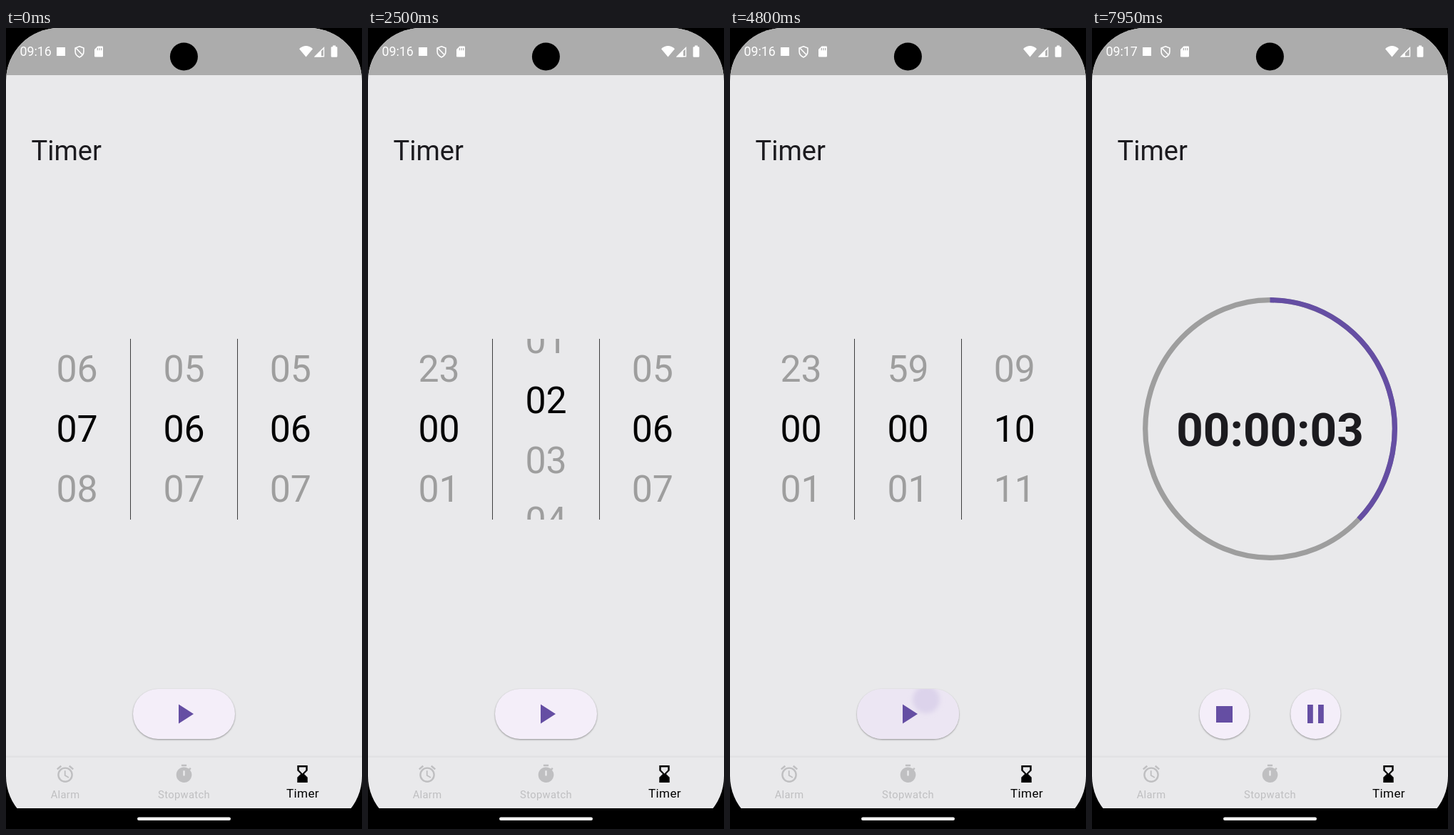
An HTML page for the animation above (8000 ms loop, 499x1121 px).

```html
<!DOCTYPE html>
<html lang="en">
<head>
<meta charset="utf-8">
<title>Timer</title>
<style>
  html, body { margin: 0; width: 100%; height: 100%; overflow: hidden; background: #000; }
  svg { display: block; width: 499px; height: 1121px; font-family: Roboto, Arial, sans-serif; }
  .mid { text-anchor: middle; }
  .wheel text { font-size: 51.8px; fill: #9e9e9e; text-anchor: middle; }
  .wheel text.on { fill: #000; }
  .nav { font-size: 14.7px; letter-spacing: .35px; fill: #bfbfc1; }
  .nav .on { font-size: 17.1px; fill: #000; }
  .button { fill: #f4eef9; filter: drop-shadow(0 1px 1.3px rgba(0, 0, 0, .38)); }
  .glyph { fill: #654ea3; }
  .ring { fill: none; stroke-width: 7.2; }
</style>
</head>
<body>
<svg viewBox="0 0 499 1121">
  <defs>
    <clipPath id="screen"><rect width="499" height="1121" rx="74"/></clipPath>
    <clipPath id="window"><rect y="435" width="499" height="253"/></clipPath>
    <clipPath id="pill"><rect x="178" y="925" width="143" height="70" rx="35"/></clipPath>
    <filter id="soft" x="-50%" y="-50%" width="200%" height="200%"><feGaussianBlur stdDeviation="3"/></filter>
  </defs>
  <rect width="499" height="1121"/>
  <g clip-path="url(#screen)">
    <rect width="499" height="1092" fill="#e9e9eb"/>
    <rect width="499" height="66" fill="#acacac"/>
    <rect y="1018.5" width="499" height="2.5" fill="#e2e2e4"/>
  </g>
  <circle cx="249.4" cy="40" r="19.5"/>
  <rect x="184" y="1104.5" width="131" height="4.5" rx="2.2" fill="#f4f4f4"/>

  <!-- status bar -->
  <g fill="#fff">
    <text id="clock" x="19.5" y="38.6" font-size="17.8"></text>
    <rect x="71" y="27" width="12" height="12"/>
    <path d="M103 25.8l5.9 2.3v5q0 5.3-5.9 7.9q-5.9-2.6-5.9-7.9v-5zM98.5 28.5l9 9.5" fill="none" stroke="#fff" stroke-width="1.6"/>
    <path d="M128.5 25.5h6.3q1.2 0 1.2 1.2v12.6q0 1.2-1.2 1.2h-9.6q-1.2 0-1.2-1.2v-9.3z"/>
    <path d="M128.3 28v3.2M131 28v3.2M133.7 28v3.2" stroke="#acacac" stroke-width="1.2"/>
    <path d="M411 29.3q9.5-8.4 19 0l-9.5 11.2z"/>
    <path d="M433.5 39.8l12-12v12z" fill="none" stroke="#fff" stroke-width="1.4"/>
    <path id="signal"/>
    <path d="M458 24.6h4v1.6h1.2q1.2 0 1.2 1.2v12.2q0 1.2-1.2 1.2h-6.4q-1.2 0-1.2-1.2v-12.2q0-1.2 1.2-1.2h1.2z"/>
  </g>

  <text x="35.5" y="185" font-size="38" fill="#1c1b1f">Timer</text>

  <g id="picker">
    <g clip-path="url(#window)">
      <g class="wheel"></g><g class="wheel"></g><g class="wheel"></g>
    </g>
    <path d="M174.5 435v253M324.5 435v253" stroke="#3c3c3c"/>
    <rect class="button" x="178" y="925" width="143" height="70" rx="35"/>
    <g id="press" clip-path="url(#pill)">
      <rect x="178" y="925" width="143" height="70" fill="#ece6f3"/>
      <circle cx="275" cy="940" r="19" fill="#dcd3eb" filter="url(#soft)"/>
    </g>
    <path class="glyph" d="M242 946.5v27l21-13.5z"/>
  </g>

  <g id="countdown">
    <ellipse class="ring" cx="249.5" cy="561" rx="174.8" ry="180.3" stroke="#9e9e9e"/>
    <path id="arc" class="ring" stroke="#654ea3"/>
    <text id="left" class="mid" x="249.5" y="585" font-size="65.5" font-weight="700" fill="#1c1b1f"></text>
    <circle class="button" cx="185.6" cy="960" r="35"/>
    <circle class="button" cx="313.4" cy="960" r="35"/>
    <path class="glyph" d="M174 949h23v23h-23zM302 947h7.8v26h-7.8zM317 947h7.8v26h-7.8z"/>
  </g>

  <g class="nav mid">
    <path transform="translate(68.6 1029.6) scale(1.2)" d="M22 5.72l-4.6-3.86-1.29 1.53 4.6 3.86zM7.88 3.39L6.6 1.86 2 5.71l1.29 1.53zM12.5 8H11v6l4.75 2.85.75-1.23-4-2.37zM12 4a9 9 0 0 0 0 18a9 9 0 0 0 0-18zm0 16a7 7 0 0 1 0-14a7 7 0 0 1 0 14z"/>
    <path transform="translate(235.1 1029.6) scale(1.2)" d="M9 1h6v2H9zM19.03 7.39l1.42-1.42q-.65-.77-1.41-1.41l-1.42 1.42A9 9 0 0 0 12 4a9 9 0 0 0 0 18a9 9 0 0 0 7.03-14.61zM13 14h-2V8h2z"/>
    <path class="on" transform="translate(401.1 1029.6) scale(1.2)" d="M18 22v-6l-4-4 4-4V2H6v6l4 4-4 4v6zM8 7.5V4h8v3.5l-4 4z"/>
    <text x="83" y="1078">Alarm</text>
    <text x="249.5" y="1078">Stopwatch</text>
    <text class="on" x="416" y="1077.3">Timer</text>
  </g>
</svg>
<script>
const LOOP = 8000, STEP = 50, ROW = 84;
const PRESS = 4800, START = 4850;
const $ = id => document.getElementById(id);
const pad = n => String(n).padStart(2, '0');
const show = (el, on) => el.style.display = on ? '' : 'none';

const easeOut = power => u => 1 - (1 - u) ** power;
const fling = u => u < 1 ? 1 - Math.exp(-4.98 * u) : 1;
const move = (t, from, to, ease) => ease(Math.min(1, Math.max(0, (t - from) / (to - from))));

const wheels = [
  { x: 99.5, size: 24, at: t => 7 - 6 * move(t, 350, 1150, easeOut(2))
      - .714 * move(t, 1200, 1450, easeOut(1.5)) - .286 * move(t, 1550, 1700, easeOut(2)) },
  { x: 249.5, size: 60, at: t => 6 - 6 * move(t, 1950, 3450, easeOut(1.94)) },
  { x: 398.8, size: 60, at: t => 6 + 4 * move(t, 3700, 4500, fling) }
];
document.querySelectorAll('.wheel').forEach((group, i) => {
  wheels[i].rows = [-2, -1, 0, 1, 2].map(offset => {
    const text = document.createElementNS('http://www.w3.org/2000/svg', 'text');
    text.setAttribute('x', wheels[i].x);
    if (!offset) text.setAttribute('class', 'on');
    group.append(text);
    return { offset, text };
  });
});

function turnWheel({ size, at, rows }, t) {
  const pos = at(t), nearest = Math.round(pos);
  for (const { offset, text } of rows) {
    const n = nearest + offset;
    text.textContent = pad((n + size) % size);
    text.setAttribute('y', 578.5 + (n - pos) * ROW);
  }
}

function drawCountdown(t) {
  const part = 1 - (t - 4824) * .0002003, angle = part * 2 * Math.PI;
  const x = 249.5 + 174.8 * Math.sin(angle), y = 561 - 180.3 * Math.cos(angle);
  $('arc').setAttribute('d', `M249.5 380.7A174.8 180.3 0 ${+(part > .5)} 1 ${x} ${y}`);
  $('left').textContent = '00:00:' + pad(Math.floor(part * 10));
}

function frame(now) {
  const t = Math.floor(now % LOOP / STEP) * STEP;
  const running = t >= START;
  show($('picker'), !running);
  show($('countdown'), running);
  show($('press'), t >= PRESS);
  if (running) drawCountdown(t);
  else wheels.forEach(wheel => turnWheel(wheel, t));
  $('clock').textContent = t < 7650 ? '09:16' : '09:17';
  const edge = t < 6900 ? 442 : 439;
  $('signal').setAttribute('d', `M432 40.5L${edge} ${472.5 - edge}V40.5z`);
  requestAnimationFrame(frame);
}
requestAnimationFrame(frame);
</script>
</body>
</html>
```
